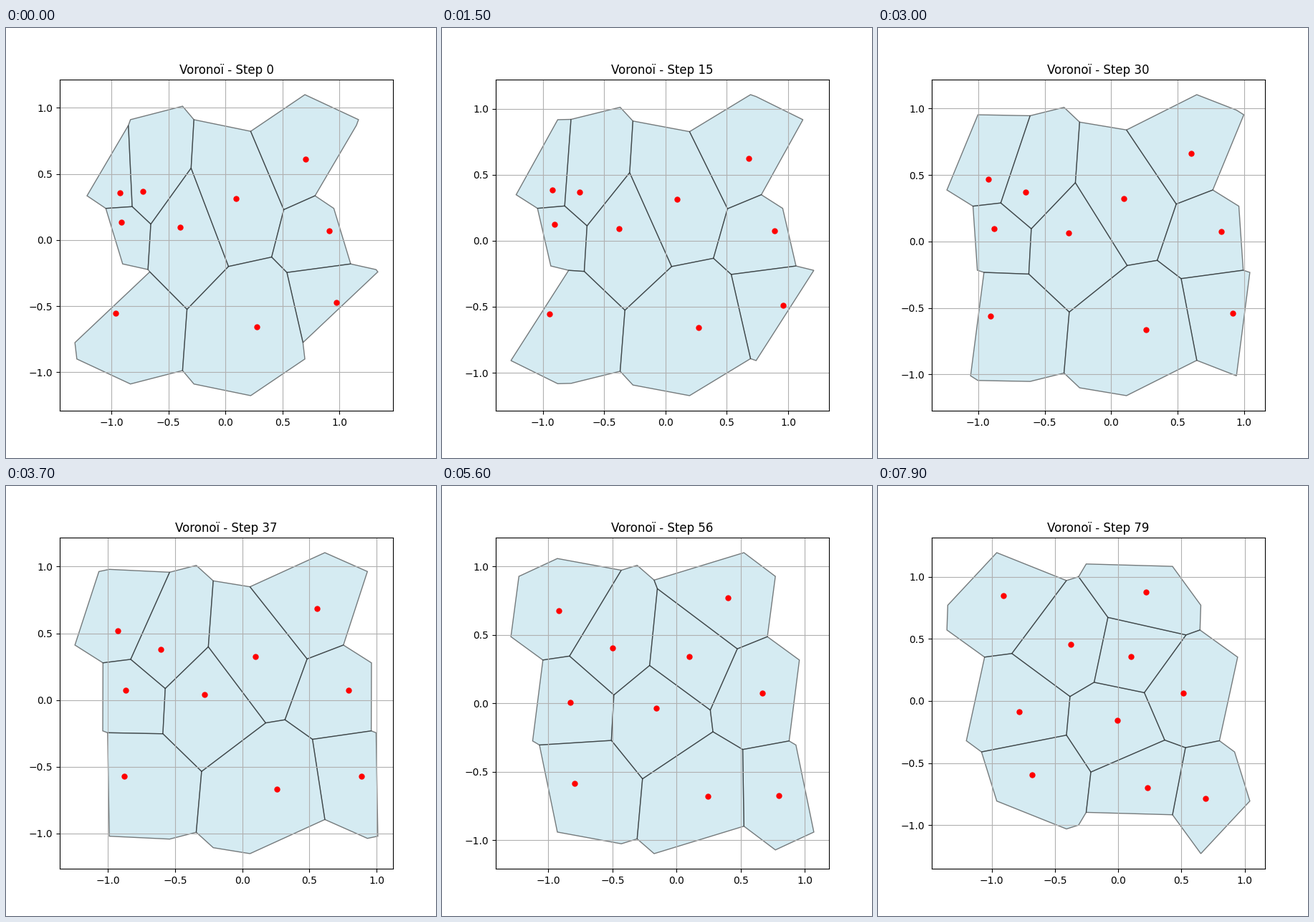
Animation of 600x600 px, one loop 8000 ms. Source, as a matplotlib script:

```python
import numpy as np
import matplotlib.pyplot as plt
from matplotlib.animation import FuncAnimation

STEPS = 80
PERIOD = 2.0    # the cells live on a torus of this side
OMEGA = 0.0275  # pace of the spring-like ease, in radians per step

# Each site glides along a smooth arc: start, halfway point, end
ARCS = np.array([
    [(-.925, .358), (-.923, .618), (-.908, .848)],
    [(-.722, .369), (-.540, .393), (-.374, .456)],
    [(-.912, .135), (-.843, .031), (-.783, -.087)],
    [(-.397, .098), (-.206, -.003), (-.006, -.157)],
    [(.093, .314), (.098, .335), (.102, .357)],
    [(.702, .612), (.460, .739), (.221, .877)],
    [(.909, .072), (.714, .074), (.516, .063)],
    [(.972, -.471), (.829, -.636), (.692, -.786)],
    [(-.962, -.552), (-.827, -.578), (-.681, -.595)],
    [(.275, -.656), (.251, -.677), (.233, -.699)],
])
SHIFTS = PERIOD * np.array([(i, j) for i in (-1, 0, 1) for j in (-1, 0, 1)])


def ease(step):
    """Start from rest like a released spring; 1 at the last step."""
    return (1 - np.cos(OMEGA * step)) / (1 - np.cos(OMEGA * (STEPS - 1)))


def sites(step):
    u = ease(step)
    start, half, end = ARCS.transpose(1, 0, 2)
    return start * (1 - u) * (1 - 2 * u) + half * 4 * u * (1 - u) + end * u * (2 * u - 1)


def clip(poly, a, b, c):
    """Keep the part of poly where a*x + b*y <= c."""
    out = []
    x0, y0 = poly[-1]
    d0 = a * x0 + b * y0 - c
    for x1, y1 in poly:
        d1 = a * x1 + b * y1 - c
        if (d0 <= 0) != (d1 <= 0):
            u = d0 / (d0 - d1)
            out.append((x0 + u * (x1 - x0), y0 + u * (y1 - y0)))
        if d1 <= 0:
            out.append((x1, y1))
        x0, y0, d0 = x1, y1, d1
    return out


def cell(site, images):
    rel = images - site
    dist = (rel ** 2).sum(axis=1)
    poly = [(-1.5, -1.5), (1.5, -1.5), (1.5, 1.5), (-1.5, 1.5)]
    for k in np.argsort(dist)[1:40]:
        poly = clip(poly, float(rel[k, 0]), float(rel[k, 1]), float(dist[k]) / 2)
    return np.array(poly) + site


def voronoi(points):
    images = (points[None] + SHIFTS[:, None]).reshape(-1, 2)
    return [cell(p, images) for p in points]


fig, ax = plt.subplots(figsize=(6, 6), dpi=100)
ax.grid(True)
patches = [ax.fill([0, 1, 1], [0, 0, 1], facecolor="lightblue",
                   edgecolor="black", alpha=0.5)[0] for _ in ARCS]
dots, = ax.plot([], [], "ro", markersize=5)
title = ax.set_title("")


def draw(step):
    points = sites(step)
    polys = voronoi(points)
    for patch, poly in zip(patches, polys):
        patch.set_xy(poly)
    dots.set_data(points[:, 0], points[:, 1])

    corners = np.vstack(polys)
    lo, hi = corners.min(axis=0), corners.max(axis=0)
    pad = 0.05 * (hi - lo)
    ax.set_xlim(lo[0] - pad[0], hi[0] + pad[0])
    ax.set_ylim(lo[1] - pad[1], hi[1] + pad[1])
    title.set_text(f"Voronoï - Step {step}")
    return [*patches, dots, title]


anim = FuncAnimation(fig, draw, frames=STEPS, interval=100, repeat=True,
                     repeat_delay=0, blit=False)
plt.show()
```
